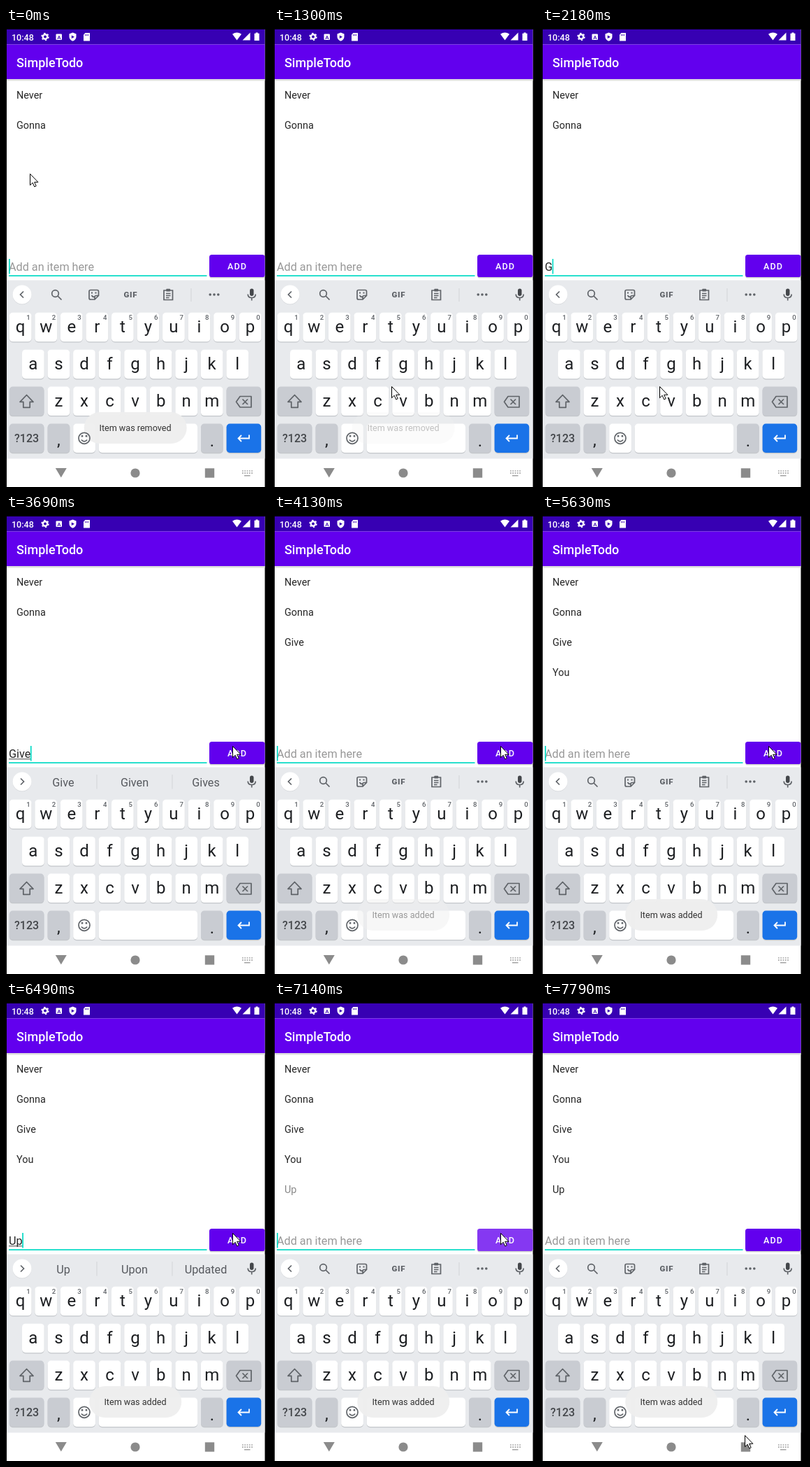
These frames come from a looping animation (375 by 656 pixels, 8000 ms). An HTML page:

```html
<!DOCTYPE html>
<html lang="en">
<head>
<meta charset="utf-8">
<title>Todo list</title>
<style>
  html, body { margin: 0; width: 100%; height: 100%; overflow: hidden; background: #000; }
  svg { display: block; width: 375px; height: 656px; font-family: Roboto, sans-serif; }
  text { white-space: pre; }
  .mid { text-anchor: middle; }
  .med { font-weight: 500; }
  .line { fill: none; stroke: #5f6368; stroke-width: 1.7; }
  .gray { fill: #5f6368; }
  .sep { fill: #d2d4d8; }
  .nav { fill: #8b8b8b; }
</style>
</head>
<body>
<svg viewBox="0 0 375 656">
  <rect width="375" height="656"/>
  <rect x="1" y="2" width="369.5" height="654" fill="#fff"/>

  <!-- status bar -->
  <rect x="1" y="2" width="369.5" height="21.5" fill="#3700b3"/>
  <g fill="#fff">
    <text class="med" x="8" y="17.5" font-size="12.5">10:48</text>
    <circle cx="56" cy="12.5" r="3.2" fill="none" stroke="#fff" stroke-width="2.4"/>
    <circle cx="56" cy="12.5" r="4.9" fill="none" stroke="#fff" stroke-width="1.6" stroke-dasharray="2.4 2.73"/>
    <rect x="71.5" y="8.5" width="8.5" height="8.5" rx="1"/>
    <path d="M95.500 6.500l5 2v4c0 3-2 5-5 6.300c-3-1.300-5-3.300-5-6.300v-4z"/>
    <path d="M113.500 7h6.500v11.500h-9v-9z"/>
    <path d="M324 8.800q6.500-4.600 13 0l-6.500 8.700zM349.500 6.500v11h-11z"/>
    <path d="M357.500 6.500h3v1.300h2v10.200h-7v-10.200h2z"/>
  </g>
  <text class="mid med" x="75.800" y="15.700" font-size="8" fill="#3700b3">A</text>
  <path d="M93.800 10.500l4.200 2.200l-4.200 2.200z" fill="#3700b3"/>
  <path d="M113.500 9v2.200M115.500 9v2.200M117.500 9v2.200" stroke="#3700b3" stroke-width=".9"/>

  <!-- app bar -->
  <rect x="1" y="73" width="369.5" height="2.500" fill="#dedede"/>
  <rect x="1" y="23.500" width="369.5" height="49.500" fill="#6200ee"/>
  <text class="med" x="15" y="55.500" font-size="18" fill="#fff">SimpleTodo</text>

  <g id="items" font-size="14.4" fill="#262626"></g>

  <!-- entry row -->
  <text id="hint" x="4" y="347" font-size="16.2" fill="#989898">Add an item here</text>
  <text id="entry" x="4" y="347" font-size="16.2" fill="#262626"></text>
  <rect id="under" x="4" y="348.300" height="1" fill="#444"/>
  <rect x="4" y="353.300" width="283.500" height="1.700" fill="#03dac5"/>
  <rect id="caret" y="330" width="1.700" height="21.500" fill="#03dac5"/>
  <rect x="291" y="325.500" width="79.500" height="32" rx="3.600" fill="#d0d0d0"/>
  <rect x="291" y="324" width="79.500" height="32" rx="3.600" fill="#6200ee"/>
  <rect id="ripple" x="291" y="324" width="79.500" height="32" rx="3.600" fill="#fff" fill-opacity=".22"/>
  <text class="mid med" x="331" y="345" font-size="12.6" letter-spacing="1.1" fill="#fff">ADD</text>

  <!-- keyboard -->
  <rect x="1" y="360.500" width="369.5" height="255" fill="#e8eaed"/>
  <circle cx="23" cy="381.800" r="13.500" fill="#d3d5d9"/>
  <circle cx="23" cy="381" r="13.500" fill="#fff"/>
  <path id="chevron" class="line" d="M25 376.500l-4.500 4.500l4.500 4.500"/>
  <g id="tools">
    <circle class="line" cx="70.500" cy="379.500" r="4.800"/>
    <path class="line" stroke-width="2" d="M74 383l5.500 5.500"/>
    <path class="line" d="M119 376.500q0-2 2-2h9.500q2 0 2 2v6l-5.500 5.500h-6q-2 0-2-2zM132.500 382.500h-3.500q-2 0-2 2v3.500M122.500 382q2 3.500 5 2"/>
    <path class="gray" d="M122 377.500h2v2h-2zM127.500 377.500h2v2h-2z"/>
    <text class="mid" x="178.300" y="385" font-size="11.500" font-weight="900" letter-spacing=".7" fill="#5f6368">GIF</text>
    <path class="line" d="M226 375h12.500v13.500h-12.500zM229 379.500h6.500M229 382.500h6.500M229 385.500h4.500"/>
    <rect class="gray" x="229.200" y="372.800" width="6" height="3.800" rx="1"/>
    <rect class="sep" x="264.500" y="372" width="1" height="19"/>
    <path d="M292.200 381h.01M298 381h.01M303.800 381h.01" stroke="#5f6368" stroke-width="3.600" stroke-linecap="round"/>
  </g>
  <g id="words" class="mid" font-size="16.2" fill="#56595e">
    <rect class="sep" x="129.500" y="371" width="1" height="20.500"/>
    <rect class="sep" x="237.500" y="371" width="1" height="20.500"/>
    <text x="82" y="387.500"></text>
    <text x="184" y="387.500"></text>
    <text x="286" y="387.500"></text>
  </g>
  <rect x="349" y="372.500" width="5.500" height="10.500" rx="2.750" fill="#44474b"/>
  <path class="line" d="M346.200 380.500q0 5 5.500 5t5.500-5M351.700 385.500v4"/>

  <g id="keys"></g>
  <path class="line" stroke="#44474b" d="M29.500 524.500l9.500 9.800h-4.800v8h-9.400v-8h-4.800z" stroke-linejoin="round"/>
  <path class="line" stroke-linejoin="round" d="M335 526.500h16v15.500h-16l-5.500-7.750zM338.500 530.500l7.500 7.500M346 530.500l-7.500 7.500"/>
  <path d="M348 581.500v5h-15M337 582l-4.500 4.500l4.500 4.500" fill="none" stroke="#fff" stroke-width="1.800"/>

  <g id="toast">
    <rect id="bubble" y="549" height="45" rx="22.500" fill="#efefef" fill-opacity=".96"/>
    <text id="msg" class="mid" x="185" y="576" font-size="12.6" fill="#333"></text>
  </g>
  <circle class="line" cx="112" cy="586.300" r="8"/>
  <path class="line" d="M107.800 588.500q4.200 4.600 8.400 0"/>
  <path class="gray" d="M107.800 582h2.500v2.600h-2.500zM113.700 582h2.500v2.600h-2.500z"/>

  <!-- navigation -->
  <path class="nav" d="M70.800 629h16l-8 13.500z"/>
  <circle class="nav" cx="185" cy="636" r="6.600"/>
  <rect class="nav" x="284.800" y="629.300" width="13.400" height="13.400"/>
  <path d="M338 633h15M338 636.200h15" stroke="#a2a2a2" stroke-width="1.700" stroke-dasharray="1.700 1.600"/>
  <path d="M341 639.800h8.500" stroke="#a2a2a2" stroke-width="1.500"/>

  <path id="mouse" d="M.5.500v16.200l3.700-3.500l2.500 5.700l2.500-1.100l-2.500-5.500h5.200z" fill="#fff" stroke="#000"/>
</svg>

<script>
const $ = id => document.getElementById(id);

function add(parent, tag, attrs, text = '') {
  const el = document.createElementNS('http://www.w3.org/2000/svg', tag);
  for (const name in attrs) el.setAttribute(name, attrs[name]);
  el.textContent = text;
  parent.append(el);
  return el;
}

// Keyboard
const PITCH = 36.55, KEY = 31.7;

function key(x, y, w, fill, label = '', style = {}) {
  const box = { x, width: w, height: 41.5, rx: 4.8 };
  add($('keys'), 'rect', { ...box, y: y + 1.2, fill: '#c3c6ca' });
  add($('keys'), 'rect', { ...box, y, fill });
  add($('keys'), 'text', {
    class: 'mid', x: x + w / 2, y: y + 28.2, 'font-size': 24, fill: '#1d1f22', ...style
  }, label);
}

[['qwertyuiop', 4.8, 406.8], ['asdfghjkl', 23, 459.7], ['zxcvbnm', 59.6, 512.6]]
  .forEach(([row, x, y]) => [...row].forEach((c, i) => key(x + i * PITCH, y, KEY, '#fff', c)));
for (let i = 0; i < 10; i++) {
  add($('keys'), 'text', {
    class: 'mid med', x: 32 + i * PITCH, y: 417.3, 'font-size': 9.6, fill: '#5f6368'
  }, (i + 1) % 10);
}
const DIM = '#c9ccd2';
key(4.8, 512.6, 49.6, DIM);
key(315.6, 512.6, 49.6, DIM);
key(4.8, 565.5, 49.6, DIM, '?123', { 'font-size': 16, y: 592, class: 'mid med', fill: '#44474b' });
key(59.6, 565.5, KEY, DIM, ',', { y: 597 });
key(96.2, 565.5, KEY, '#fff');
key(132.7, 565.5, 141.3, '#fff');
key(279, 565.5, KEY, DIM, '.', { y: 598 });
key(315.6, 565.5, 49.6, '#1a73e8');

const items = ['Never', 'Gonna', 'Give', 'You', 'Up'].map((word, i) =>
  add($('items'), 'text', { x: 15, y: 100.5 + 43 * i }, word));

// Each cue changes part of the state and holds until the next one
const LOOP = 8000;
const clear = { text: '', marked: 0, words: '', caret: 1, fresh: 0.55, ripple: 1 };
const settled = { fresh: 1, ripple: 0 };
const type = (text, marked = 0, words = '') => ({ text, marked, words, caret: 1 });

const cues = [
  [0, { ...clear, ...settled, count: 2, mouse: [34, 208], toast: 1, msg: 'Item was removed' }],
  [220, { mouse: [110, 380] }],
  [440, { mouse: [168, 512], caret: 0 }],
  [870, { caret: 1 }],
  [1090, { toast: 0.6 }],
  [1300, { toast: 0.3, caret: 0 }],
  [1520, { toast: 0.12 }],
  [1740, { toast: 0, caret: 1 }],
  [1960, { caret: 0 }],
  [2180, type('G')],
  [2400, type('Giv', 2, 'Gi Give Girl')],
  [2620, type('Give', 4, 'Give Given Gives')],
  [3280, { caret: 0 }],
  [3500, { mouse: [280, 390] }],
  [3690, { mouse: [324, 330], caret: 1 }],
  [3910, { ...clear, count: 3 }],
  [4130, { ...settled, toast: 0.5, msg: 'Item was added' }],
  [4340, { ...type('Y'), toast: 1 }],
  [4560, type('Yo', 1, 'Y You Yes')],
  [4780, type('You', 3, "You Your You're")],
  [5410, { ...clear, count: 4 }],
  [5630, settled],
  [5840, { caret: 0 }],
  [6060, { ...type('U'), toast: 0.4 }],
  [6270, { ...type('Up', 1, 'U Up Us'), toast: 1 }],
  [6490, type('Up', 2, 'Up Upon Updated')],
  [6930, { caret: 0 }],
  [7140, { ...clear, count: 5 }],
  [7360, settled],
  [7570, { mouse: [316, 430] }],
  [7790, { mouse: [290, 619], caret: 0 }]
];

const show = (el, opacity) => el.setAttribute('opacity', Number(opacity));

function draw(time) {
  const s = Object.assign({}, ...cues.filter(c => c[0] <= time).map(c => c[1]));

  items.forEach((el, i) => show(el, i >= s.count ? 0 : i === s.count - 1 ? s.fresh : 1));

  const entry = $('entry');
  entry.textContent = s.text;
  show($('hint'), !s.text);
  $('under').setAttribute('width', s.marked ? entry.getSubStringLength(0, s.marked) : 0);
  $('caret').setAttribute('x', 4 + (s.text ? entry.getComputedTextLength() - 0.4 : 0));
  show($('caret'), s.caret);
  show($('ripple'), s.ripple);

  const words = s.words.split(' ');
  $('words').querySelectorAll('text').forEach((el, i) => { el.textContent = words[i] || ''; });
  show($('words'), s.words !== '');
  show($('tools'), s.words === '');
  $('chevron').setAttribute('transform', s.words ? 'rotate(180 23 381)' : '');

  const width = s.msg === 'Item was added' ? 132 : 147;
  $('msg').textContent = s.msg;
  $('bubble').setAttribute('x', 185.2 - width / 2);
  $('bubble').setAttribute('width', width);
  show($('toast'), s.toast);

  $('mouse').setAttribute('transform', `translate(${s.mouse})`);
}

let start;
function tick(now) {
  start ??= now;
  draw((now - start) % LOOP);
  requestAnimationFrame(tick);
}
draw(0);
requestAnimationFrame(tick);
</script>
</body>
</html>
```
